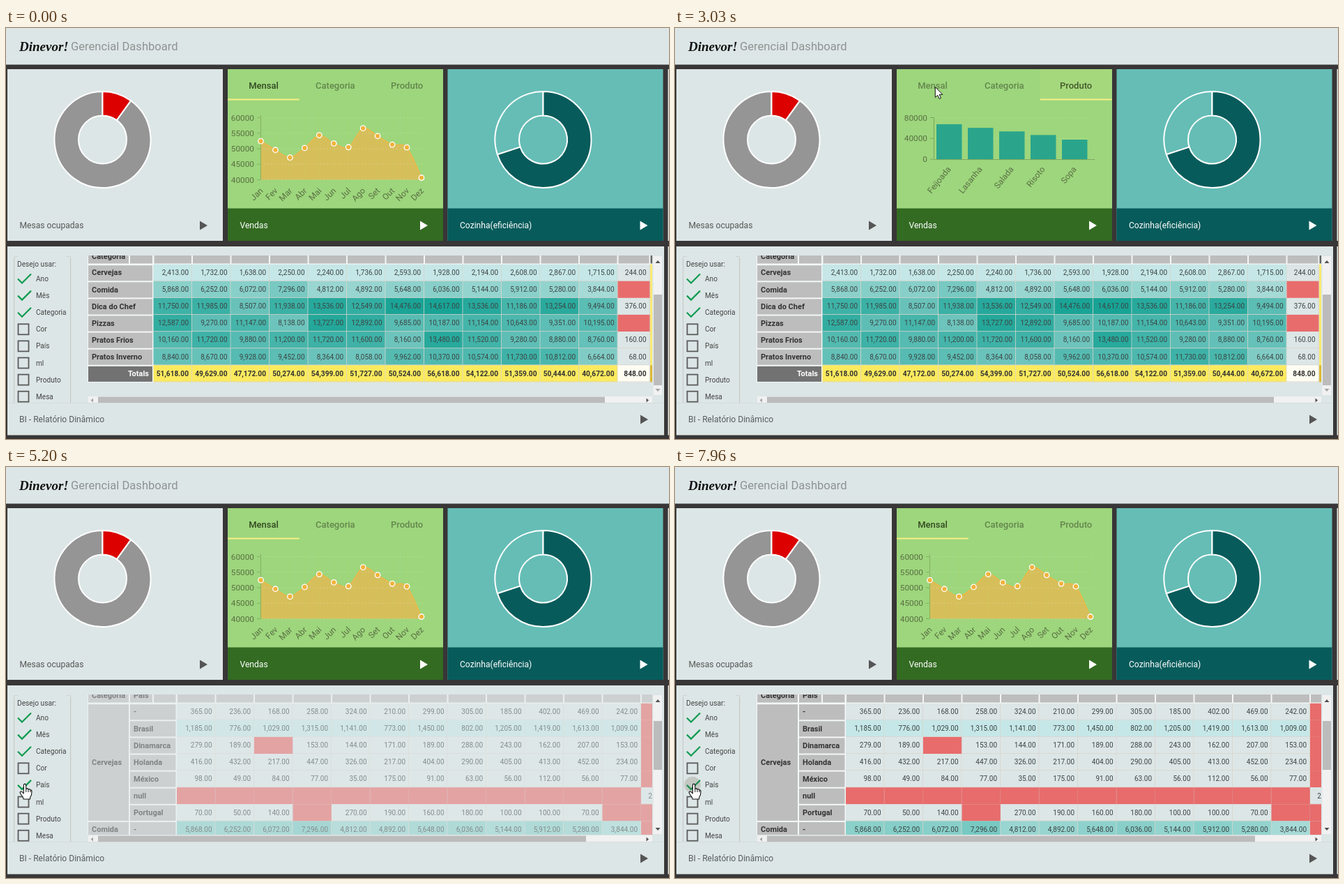
An HTML page with a canvas for the animation above (7990 ms loop, 951 px wide and 589 px high).

```html
<!DOCTYPE html>
<html lang="pt">
<head>
<meta charset="utf-8">
<title>Gerencial Dashboard</title>
<style>
html, body { margin: 0; width: 100%; height: 100%; overflow: hidden; background: #383636; }
canvas { display: block; }
</style>
</head>
<body>
<canvas id="stage" width="951" height="589"></canvas>
<script>
const g = document.getElementById('stage').getContext('2d');
const LOOP = 7990, BG = '#dde6e6', GREY = '#bdbdbd', RED = '#e86c6c';

const sales = {
  'Cervejas': [2413, 1732, 1638, 2250, 2240, 1736, 2593, 1928, 2194, 2608, 2867, 1715],
  'Comida': [5868, 6252, 6072, 7296, 4812, 4892, 5648, 6036, 5144, 5912, 5280, 3844],
  'Dica do Chef': [11750, 11985, 8507, 11938, 13536, 12549, 14476, 14617, 13536, 11186, 13254, 9494],
  'Pizzas': [12587, 9270, 11147, 8138, 13727, 12892, 9685, 10187, 11154, 10643, 9351, 10195],
  'Pratos Frios': [10160, 11720, 9880, 11200, 11720, 11600, 8160, 13480, 11520, 9280, 8880, 8760],
  'Pratos Inverno': [8840, 8670, 9928, 9452, 8364, 8058, 9962, 10370, 10574, 11730, 10812, 6664]
};
const extra = [244, 0, 376, 0, 160, 68];
const beers = {
  '-': [365, 236, 168, 258, 324, 210, 299, 305, 185, 402, 469, 242],
  'Brasil': [],
  'Dinamarca': [279, 189, 0, 153, 144, 171, 189, 288, 243, 162, 207, 153],
  'Holanda': [416, 432, 217, 447, 326, 217, 404, 290, 405, 413, 452, 234],
  'México': [98, 49, 84, 77, 35, 175, 91, 63, 56, 112, 56, 77],
  'null': Array(12).fill(0),
  'Portugal': [70, 50, 140, 0, 270, 190, 160, 180, 100, 100, 70, 0]
};
const sum = a => a.reduce((p, q) => p + q, 0);
const column = (rows, i) => sum(Object.values(rows).map(r => r[i] || 0));
beers.Brasil = sales.Cervejas.map((v, i) => v - column(beers, i));
const totals = sales.Cervejas.map((_, i) => column(sales, i));
const months = 'Jan Fev Mar Abr Mai Jun Jul Ago Set Out Nov Dez'.split(' ');

const clamp = v => Math.max(0, Math.min(1, v));
const ramp = (t, a, b) => clamp((t - a) / (b - a));
const smooth = p => p * p * (3 - 2 * p);
const mix = (a, b, p) => a + (b - a) * p;
const outCubic = p => 1 - (1 - p) ** 3;

function rect(x, y, w, h, c) { g.fillStyle = c; g.fillRect(x, y, w, h); }
function text(s, x, y, size, color, { w = 400, align = 'left', rot = 0, font = 'Roboto, sans-serif' } = {}) {
  g.save();
  g.translate(x, y);
  g.rotate(rot * Math.PI / 180);
  g.font = `${w} ${size}px ${font}`;
  g.textAlign = align;
  g.fillStyle = color;
  g.fillText(s, 0, size * .355);
  g.restore();
}
function poly(points, fill, stroke, width = 1, close = true) {
  g.beginPath();
  for (let i = 0; i < points.length; i += 2) g.lineTo(points[i], points[i + 1]);
  if (close) g.closePath();
  if (fill) { g.fillStyle = fill; g.fill(); }
  if (stroke) { g.strokeStyle = stroke; g.lineWidth = width; g.stroke(); }
}
function line(x1, y1, x2, y2, c, w = 1) { poly([x1, y1, x2, y2], null, c, w, false); }
function disc(x, y, r, fill) { g.beginPath(); g.arc(x, y, r, 0, 7); g.fillStyle = fill; g.fill(); }
function clipped(x, y, w, h, draw) {
  g.save();
  g.beginPath();
  g.rect(x, y, w, h);
  g.clip();
  draw();
  g.restore();
}
const play = (x, y, c) => poly([x, y - 6.5, x + 11, y, x, y + 6.5], c);

function ring(cx, from, to, fill) {
  const a = from * 2 * Math.PI - Math.PI / 2, b = to * 2 * Math.PI - Math.PI / 2;
  g.beginPath();
  g.arc(cx, 160, 69, a, b);
  g.arc(cx, 160, 34.5, b, a, true);
  g.closePath();
  if (fill) { g.fillStyle = fill; g.fill(); }
  g.strokeStyle = '#fff';
  g.lineWidth = 2;
  g.stroke();
}

function card(x, bg, foot, label, ink) {
  rect(x, 59, 309, 246, bg);
  rect(x, 258.5, 309, 46.5, foot);
  text(label, x + 17.5, 283, 12.1, ink);
  play(x + 276, 283, ink);
}

// ---- sales chart ----
const INK = '#5b6f45', GRID = 'rgba(255,255,255,.2)';

function areaChart(p) {
  const xs = months.map((_, i) => 365.5 + i * 20.95);
  const ys = totals.map((v, i) => 217.5 - (v + (i ? 0 : 848) - 40000) * .00444 * p);
  const curve = () => {
    for (let i = 0; i < 11; i++) {
      const a = Math.max(0, i - 1), b = Math.min(11, i + 2), k = 6.5;
      g.bezierCurveTo(xs[i] + (xs[i + 1] - xs[a]) / k, ys[i] + (ys[i + 1] - ys[a]) / k,
        xs[i + 1] - (xs[b] - xs[i]) / k, ys[i + 1] - (ys[b] - ys[i]) / k, xs[i + 1], ys[i + 1]);
    }
  };
  g.beginPath();
  g.moveTo(xs[0], 217.5);
  g.lineTo(xs[0], ys[0]);
  curve();
  g.lineTo(xs[11], 217.5);
  g.fillStyle = 'rgba(236,184,80,.72)';
  g.fill();
  g.setLineDash([2, 3]);
  for (let i = 0; i < 5; i++) line(365, 128.5 + i * 22.25, 601, 128.5 + i * 22.25, GRID);
  xs.forEach(x => line(x, 125, x, 217, 'rgba(190,215,90,.4)'));
  g.setLineDash([]);
  line(365.5, 125, 365.5, 218, 'rgba(90,120,60,.4)');
  for (let i = 0; i < 5; i++) {
    text(60000 - i * 5000, 356, 128.5 + i * 22.25, 11.8, INK, { align: 'right' });
    line(360, 128.5 + i * 22.25, 365, 128.5 + i * 22.25, 'rgba(90,120,60,.4)');
  }
  g.beginPath();
  g.moveTo(xs[0], ys[0]);
  curve();
  g.strokeStyle = '#eeb846';
  g.lineWidth = 1.5;
  g.stroke();
  xs.forEach((x, i) => {
    disc(x, ys[i], 4.4, '#fff');
    disc(x, ys[i], 3.1, '#f2b23c');
    text(months[i], x + 1, 231, 12, INK, { align: 'right', rot: -45 });
  });
}

function barChart(p, max, names, values) {
  for (let i = 0; i < 3; i++) {
    const y = 128.5 + i * 29.75;
    text(max * (2 - i) / 2, 362, y, 11.8, INK, { align: 'right' });
    g.setLineDash([2, 3]);
    line(371, y, 601, y, GRID);
    g.setLineDash([]);
    line(366, y, 371, y, 'rgba(90,120,60,.5)');
  }
  line(371.5, 128, 371.5, 188, 'rgba(90,120,60,.5)');
  line(371, 188.5, 602, 188.5, 'rgba(90,120,60,.5)');
  names.forEach((name, i) => {
    const h = values[i] / max * 59.5 * p, x = 375 + i * 45;
    rect(x, 188 - h, 36.5, h, '#2aa58c');
    text(name, x + 18, 200, 12, INK, { align: 'right', rot: -51 });
  });
}
const topNames = ['Dica do Chef', 'Pizzas', 'Pratos Frios', 'Pratos Inverno', 'Comida'];
const charts = [
  areaChart,
  p => barChart(p, 160000, topNames.map(n => n.slice(0, n[0] === 'D' ? 10 : 10).replace('Frios', 'Fri')), topNames.map(n => sum(sales[n]))),
  p => barChart(p, 80000, ['Feijoada', 'Lasanha', 'Salada', 'Risoto', 'Sopa'], [68000, 61000, 54000, 47000, 38000])
];

// ---- tabs: [click time, tab, pointer x, pointer y] ----
const clicks = [[-5000, 0, 372, 84], [1740, 1, 463, 91], [2205, 2, 568, 85], [3070, 0, 372, 84]];

function salesCard(t) {
  card(318, '#9dd67c', '#336b22', 'Vendas', '#fff');
  const n = clicks.filter(c => t >= c[0] + 40).length - 1;
  const [at, tab] = clicks[n], from = n ? clicks[n - 1][1] : 0;
  charts[tab](outCubic(ramp(t, at + 40, at + 1040)));

  ['Mensal', 'Categoria', 'Produto'].forEach((s, i) =>
    text(s, 369.5 + i * 102.8, 82, 13, i === tab ? '#334a22' : '#64864e', { w: 500, align: 'center' }));

  // the bar stretches to the new tab first, then lets go of the old one
  const lead = smooth(ramp(t, at + 40, at + 180)), trail = smooth(ramp(t, at + 180, at + 360));
  const right = tab > from;
  const l = mix(from, tab, right ? trail : lead), r = mix(from, tab, right ? lead : trail);
  rect(318 + l * 102.8, 101.5, (r - l + 1) * 102.8, 2, '#f8ef86');

  clicks.forEach(([start, i, x, y]) => {
    const age = t - start;
    if (age < 0 || age > 900) return;
    clipped(318 + i * 102.8, 59, 102.8, 44.5, () =>
      disc(x, y, 130 * (1 - 80 ** (-age / 1100)), `rgba(248,238,136,${.97 * (1 - age / 900)})`));
  });
}

// ---- pivot table ----
function heat(v) {
  if (!v) return RED;
  if (v < 700) return BG;
  if (v < 3000) return '#c6e7e7';
  const p = v / 14617;
  return `rgb(${mix(216, 24, p)},${mix(238, 163, p)},${mix(238, 149, p)})`;
}
const money = v => v.toLocaleString('en-US') + '.00';
const ROW = 24.1, TOP = 338.7, COL = 55.5;

function cell(x, y, w, v, bg, bold) {
  rect(x, y, w, ROW, bg);
  if (bg !== RED) {
    rect(x + w - 1, y, 1, ROW, 'rgba(215,213,205,.8)');
    rect(x, y + ROW - 1, w, 1, 'rgba(215,213,205,.8)');
  } else rect(x + w - 1, y, 1, ROW, 'rgba(215,150,145,.5)');
  if (v) text(money(v), x + w - 5, y + 11.8, bold ? 10.2 : 10, bold ? '#333' : '#3c4444', { w: bold ? 700 : 400, align: 'right' });
}
function head(s, x, y, w, h = 22.1, bg = GREY, ink = '#333') {
  rect(x, y + 1.5, w, h, bg);
  text(s, x + 5, y + h / 2 + .8, 11, ink, { w: 700 });
}
function topRow(x0, wide) {
  rect(117, 326, 810, 13.2, '#f4f7f7');
  rect(118, 326, 58, 11.5, GREY);
  rect(178, 326, 32, 11.5, GREY);
  if (wide) rect(212, 326, 31.5, 11.5, GREY);
  for (let i = 0; i < 13; i++) rect(x0 + i * COL + 1, 326, (i < 12 ? COL : 46) - 2, 11.5, GREY);
  text('Categoria', 123, 327.2, 11, '#333', { w: 700 });
  if (wide) text('País', 183, 327.2, 11, '#333', { w: 700 });
}
function dataRow(x0, y, values, last, bold) {
  values.forEach((v, i) => cell(x0 + i * COL, y, COL, v, bold ? '#fbea5e' : heat(v), bold));
  cell(x0 + 12 * COL, y, 46, last, bold ? '#fffdf2' : heat(last), bold);
}
function categoryTable() {
  const x0 = 211.5;
  rect(117, 326, 94.5, 182, '#f4f7f7');
  topRow(x0, false);
  rect(924.5, 326, 3, 11.5, '#666');
  Object.entries(sales).forEach(([name, values], i) => {
    const y = TOP + i * ROW;
    head(name, 118, y, 92);
    dataRow(x0, y, values, extra[i]);
    rect(924, y, 3, ROW, '#f9ea70');
  });
  const y = TOP + 6 * ROW;
  rect(118, y + 1.5, 92, 22.1, '#727272');
  text('Totals', 205, y + 11.8, 11, '#fff', { w: 700, align: 'right' });
  dataRow(x0, y, totals, 848, true);
  rect(924, y, 3, ROW, '#dcb930');
}
function countryTable() {
  const x0 = 245;
  rect(117, 326, 128, 201, '#f4f7f7');
  topRow(x0, true);
  head('Cervejas', 118, TOP, 58, 7 * ROW - 2);
  Object.entries(beers).forEach(([name, values], i) => {
    head(name, 178, TOP + i * ROW, 65.5);
    dataRow(x0, TOP + i * ROW, values, name === 'null' ? 244 : 0);
  });
  const y = TOP + 7 * ROW;
  head('Comida', 118, y, 58);
  head('-', 178, y, 65.5);
  dataRow(x0, y, sales.Comida, 0);
}

// [table swap, fade start, fade end]
const swaps = [[4820, 5180, 5700], [5870, 6070, 6570], [6730, 6960, 7410]];

function report(t) {
  rect(2, 313, 942, 270.5, BG);
  const n = swaps.filter(s => t >= s[0]).length, wide = n % 2 === 1;
  clipped(117, 326, 810, 201, () => {
    (wide ? countryTable : categoryTable)();
    if (n) {
      g.globalAlpha = .45 * (1 - smooth(ramp(t, swaps[n - 1][1], swaps[n - 1][2])));
      rect(117, 326, 810, 201, BG);
      g.globalAlpha = 1;
    }
  });
  rect(118, 528, 809, 9, '#f1f1f1');
  rect(132, 528.5, wide ? 700 : 727, 8.5, '#bcbcbc');
  poly([121.5, 533.5, 125, 530.5, 125, 536.5], '#a3a3a3');
  poly([922, 533.5, 918.5, 530.5, 918.5, 536.5], '#505050');
  rect(928.5, 327, 12.5, 199, '#f1f1f1');
  if (wide) rect(929, 364, 12, 70, '#bcbcbc');
  else rect(929, 382, 12, 130, '#bcbcbc');
  poly([931.5, 337, 938.5, 337, 935, 333], '#505050');
  poly([931.5, 517, 938.5, 517, 935, 521], wide ? '#505050' : '#a3a3a3');
  sidebar(t);
  rect(2, 537, 942, 1, 'rgba(0,0,0,.04)');
  text('BI - Relatório Dinâmico', 19, 561, 12.1, '#585c5c');
  play(910, 561, '#555');
}

function tick(y, p) {
  g.save();
  g.translate(25, y);
  g.scale(p, p);
  poly([-8, 0, -2, 6, 11, -7], null, '#0d9b50', 2.2, false);
  g.restore();
}
const options = ['Ano', 'Mês', 'Categoria', 'Cor', 'País', 'ml', 'Produto', 'Mesa'];
const presses = [4800, 5830, 6700, 7915];

function sidebar(t) {
  clipped(2, 326, 110, 211, () => {
    rect(11, 329, 1.2, 208, '#c6cbc8');
    rect(92, 329, 1.2, 208, '#c6c8c4');
    rect(11, 327, 6, 1, '#d0d3ce');
    rect(87, 327, 6, 1, '#d0d3ce');
    text('Desejo usar:', 16, 338.5, 10.2, '#444');
    options.forEach((s, i) => {
      const y = 359.5 + i * 24.1;
      text(s, 43, y, 10.1, '#444');
      const p = i < 3 ? 1 : i === 4 ? ramp(t, 5060, 5190) - ramp(t, 5960, 6110) + ramp(t, 6930, 7070) : 0;
      if (p > 0) tick(y, p);
      else {
        g.strokeStyle = '#5a5a5a';
        g.lineWidth = 1.8;
        g.strokeRect(17.5, y - 7.5, 15, 15);
      }
    });
    presses.forEach(at => {
      const age = t - at;
      if (age >= 0 && age < 400) disc(25, 455.5, 24 * (1 - 80 ** (-age / 300)), `rgba(105,95,75,${.25 * (1 - age / 400)})`);
    });
  });
}

// ---- pointer: [time, x, y] ----
const path = [[490, 534, 6], [820, 467, 92], [1220, 467, 92], [1380, 463, 91], [1740, 463, 91], [2190, 568, 85],
  [2530, 568, 85], [3050, 372, 84], [3160, 372, 84], [3750, 8, 490], [3850, 8, 490], [4140, 27, 454], [LOOP, 27, 454]];

function pointer(t) {
  if (t < 490) return;
  const i = path.findIndex(k => t < k[0]), a = path[i - 1], b = path[i];
  const p = smooth(ramp(t, a[0], b[0]));
  g.save();
  g.translate(mix(a[1], b[1], p), mix(a[2], b[2], p));
  g.lineJoin = 'round';
  if (t < 3690) poly([.5, .5, .5, 15.5, 4, 12.3, 6.3, 17.5, 8.7, 16.4, 6.4, 11.3, 11, 11.3], '#fff', '#111');
  else {
    poly([-1.5, 1, 0, 0, 1.5, 1, 1.8, 7, 4, 6.6, 5, 8, 7, 7.5, 8, 9, 9.5, 9, 10, 11, 9.5, 16, 7.8, 19, 7.5, 22,
      -2, 22, -2.5, 19.5, -5, 16, -7, 12.5, -6, 11, -4, 11.5, -1.7, 14], '#fff', '#111', 1.1);
    line(1.8, 7, 1.8, 12, '#111');
    line(5, 8, 5, 12, '#111');
    line(8, 9, 8, 12, '#111');
  }
  g.restore();
}

function draw(t) {
  rect(0, 0, 951, 589, '#383636');
  rect(0, 0, 951, 52.5, BG);
  text('Dinevor!', 19, 26, 19, '#111', { w: 'italic 700', font: '"Liberation Serif", serif' });
  text('Gerencial Dashboard', 93, 26, 16.6, '#8e9392');
  rect(949.5, 59, 2, 246, BG);
  rect(949.5, 313, 2, 270.5, BG);

  card(2, BG, BG, 'Mesas ocupadas', '#555');
  ring(138.5, .1, 1, '#959595');
  ring(138.5, 0, .1, '#dc0000');
  salesCard(t);
  card(633.5, '#65bdb6', '#085b5b', 'Cozinha(eficiência)', '#fff');
  ring(770.5, .7, 1);
  ring(770.5, 0, .7, '#085b5b');
  report(t);
  pointer(t);
}

function frame(now) {
  draw(now % LOOP);
  requestAnimationFrame(frame);
}
requestAnimationFrame(frame);
</script>
</body>
</html>
```
